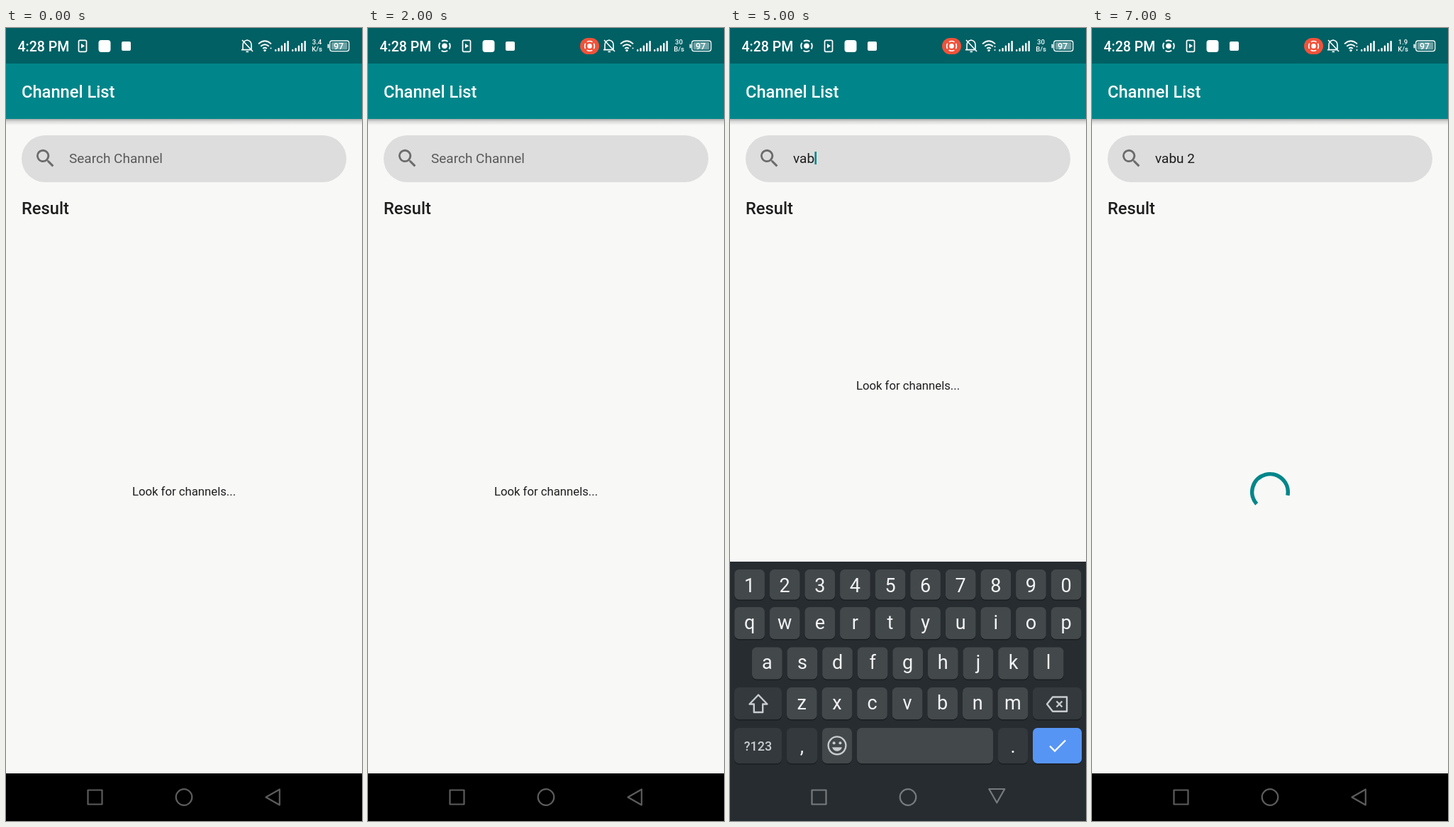
An HTML page for the animation above (8 s loop, 502 by 1116 pixels).

```html
<!DOCTYPE html>
<html lang="en">
<head>
<meta charset="utf-8">
<title>Channel search</title>
<style>
  html, body { margin: 0; width: 100%; height: 100%; overflow: hidden; background: #f8f8f7; }
  svg { display: block; width: 100%; height: 100%; font-family: Roboto, sans-serif; }
  .line { fill: none; stroke: #fff; }
  .white { fill: #fff; }
  .medium { font-weight: 500; }
  .heading { font-weight: 500; font-size: 23.7px; }
  .body { font-size: 19px; }
  .mid { text-anchor: middle; }
  .speed { font-size: 9.5px; font-weight: 500; }
  .icon { fill: none; stroke: #c9cccf; stroke-width: 2.4; stroke-linejoin: round; }
  #nav { fill: none; stroke-width: 2.2; stroke-linejoin: round; }
</style>
</head>
<body>
<svg viewBox="0 0 502 1116" preserveAspectRatio="none">
  <defs>
    <linearGradient id="shade" x2="0" y2="1">
      <stop offset="0" stop-color="#000" stop-opacity=".32"/>
      <stop offset=".4" stop-color="#000" stop-opacity=".12"/>
      <stop offset="1" stop-color="#000" stop-opacity="0"/>
    </linearGradient>
    <g id="record">
      <circle r="3.8"/>
      <circle r="7.8" fill="none" stroke="#fff" stroke-width="1.9" stroke-dasharray="9.2 3.05" stroke-dashoffset="4.6"/>
    </g>
  </defs>

  <rect width="502" height="1116" fill="#f8f8f7"/>
  <rect y="128" width="502" height="9" fill="url(#shade)"/>
  <rect y="50" width="502" height="78" fill="#00868a"/>
  <rect width="502" height="50" fill="#006064"/>

  <text class="white medium" x="16.5" y="32.7" font-size="19.5">4:28 PM</text>
  <use id="leftRecord" href="#record" class="white" x="108" y="25.3"/>
  <g id="notices" class="white">
    <rect class="line" x="102.5" y="17.3" width="11" height="16" rx="1.8" stroke-width="1.7"/>
    <path d="M106 22v6.6l5-3.3z"/>
    <rect x="130.5" y="17" width="17" height="17" rx="4"/>
    <rect x="163" y="19" width="13" height="13" rx="2"/>
  </g>
  <g id="badge">
    <rect x="299" y="14" width="27" height="23" rx="11.5" fill="#f0523a"/>
    <use href="#record" class="white" transform="translate(312.5 25.4) scale(.88)"/>
  </g>
  <g class="line" stroke-width="1.8">
    <path d="M334 31V24q0-6 6-7 6 1 6 7v6M332 30.6h14M333 17l15 16M338.5 33.4h3.5" stroke-width="1.6"/>
    <path d="M356 22.3q9-8 18 0M359.2 25.8q5.8-5 11.6 0M362.2 29q2.8-2.4 5.6 0"/>
  </g>
  <circle class="white" cx="365" cy="31.6" r="1.7"/>
  <g id="dots" class="white"></g>
  <g id="bars" class="white"></g>
  <text id="speed" class="white speed mid" x="438.5" y="23.3"></text>
  <text id="unit" class="white speed mid" x="438.5" y="33.4"></text>
  <rect x="453.5" y="22.5" width="2" height="6" rx="1" class="white"/>
  <rect class="line" x="456.7" y="18" width="27" height="14.6" rx="3" stroke-width="1.3"/>
  <rect x="458.8" y="20" width="22.6" height="10.6" rx="1" fill="#fff" opacity=".42"/>
  <text class="white medium mid" x="469" y="30" font-size="12.5">97</text>

  <text class="white heading" x="22" y="97.5">Channel List</text>
  <rect x="22" y="151" width="458" height="66" rx="33" fill="#dddddd"/>
  <path transform="translate(38.8 166.8) scale(1.394)" fill="#6c6c6c"
    d="M15.5 14h-.8l-.27-.27A6.5 6.5 0 1 0 13.7 14.43l.3.27v.8l5 5L20.5 19zM9.5 14a4.5 4.5 0 1 1 0-9 4.5 4.5 0 0 1 0 9z"/>
  <text id="query" class="body" x="89" y="189.6"></text>
  <rect id="cursor" y="174" width="2.6" height="18" fill="#00868a"/>
  <text class="heading" x="22" y="262" fill="#1e1e1e">Result</text>
  <text id="hint" class="mid" x="251" font-size="16.73" fill="#1e1e1e">Look for channels...</text>
  <path id="spinner" fill="none" stroke="#00868a" stroke-width="5.5"/>

  <rect y="1049" width="502" height="67"/>
  <g id="keyboard">
    <rect y="751" width="502" height="365" fill="#272c30"/>
    <g id="keys"></g>
    <g class="icon">
      <path d="M40 938.5 52.5 951.5H46.2V963H33.8V951.5H27.5z"/>
      <path d="M447 951.5 455 941.5H475V961.8H455zM460.4 947.5l8 8m0-8l-8 8"/>
      <circle cx="151" cy="1009.8" r="12.4"/>
      <path d="M451 1010.5l7 7 15-15" stroke="#fff" stroke-linejoin="miter"/>
    </g>
    <g fill="#c9cccf">
      <circle cx="146.6" cy="1006.3" r="2"/><circle cx="155.4" cy="1006.3" r="2"/>
      <path d="M144 1012.3h14q-2 5.4-7 5.4t-7-5.4z"/>
    </g>
  </g>
  <g id="nav">
    <rect x="115.5" y="1072.5" width="20" height="20"/>
    <circle cx="251" cy="1082.5" r="11.3"/>
    <path id="back" d="M-13 0 6.3-11V11z"/>
  </g>
</svg>
<script>
const $ = id => document.getElementById(id);

function add(parent, tag, attrs, text = '') {
  const node = document.createElementNS('http://www.w3.org/2000/svg', tag);
  for (const name in attrs) node.setAttribute(name, attrs[name]);
  node.textContent = text;
  return parent.appendChild(node);
}

function set(id, attrs) {
  for (const name in attrs) $(id).setAttribute(name, attrs[name]);
}

function show(id, visible) {
  $(id).style.display = visible ? '' : 'none';
}

function drawKey(x, y, w, h, fill, label = '', baseline = 0, size = 27) {
  add($('keys'), 'rect', { x, y: y + 1.5, width: w, height: h, rx: 6.5, fill: '#1a1e21' });
  add($('keys'), 'rect', { x, y, width: w, height: h, rx: 6.5, fill });
  add($('keys'), 'text', {
    x: x + w / 2, y: baseline, class: size < 20 ? 'mid medium' : 'mid',
    'font-size': size, fill: size < 20 ? '#c9cccf' : '#f2f3f4'
  }, label);
}

const KEY = '#43484b', DARK = '#33393d', PITCH = 49.6;
[
  ['1234567890', 6.3, 762, 42.5, 794],
  ['qwertyuiop', 6.3, 815, 45, 845.5],
  ['asdfghjkl', 31, 871.5, 45, 902],
  ['zxcvbnm', 80, 928, 45, 958.5]
].forEach(([letters, left, top, height, baseline]) =>
  [...letters].forEach((letter, i) =>
    drawKey(left + i * PITCH, top, 42.6, height, KEY, letter, baseline)));
drawKey(6, 928, 67, 45, DARK);
drawKey(427, 928, 69, 45, DARK);
drawKey(6, 985, 67, 50, DARK, '?123', 1017, 18);
drawKey(80, 985, 43, 50, DARK, ',', 1020);
drawKey(130, 985, 42, 50, KEY);
drawKey(179, 985, 192, 50, KEY);
drawKey(378, 985, 42, 50, DARK, '.', 1020);
drawKey(427, 985, 69, 50, '#5795f5');

for (const left of [379, 403])
  [3, 5, 8.5, 12, 15].forEach((height, i) =>
    add($('bars'), 'rect', { x: left + i * 4.35, y: 33 - height, width: 2.4, height, rx: 1 }));

const onRing = degrees => {
  const a = degrees * Math.PI / 180;
  return `${251 + 25.3 * Math.cos(a)} ${653 + 25.3 * Math.sin(a)}`;
};
set('spinner', { d: `M${onRing(138)}A25.3 25.3 0 1 1 ${onRing(11)}` });

const BACK = {
  left: 'translate(379.5 1082.5)',
  turning: 'translate(378.7 1081.2) rotate(-24)',
  down: 'translate(376.3 1077.3) rotate(-90)'
};
const STEP = 1000;
const base = { badge: true, shifted: true, rate: '30 B/s', dots: 2, back: 'left', query: '' };
const steps = [
  { badge: false, shifted: false, rate: '3.4 K/s', dots: 1 },
  { shifted: false, rate: '3.4 K/s', dots: 1 },
  { dots: 1 },
  { cursor: true, back: 'turning' },
  { cursor: true, back: 'down', keyboard: true },
  { cursor: true, back: 'down', keyboard: true, query: 'vab' },
  { back: 'down', keyboard: true, query: 'vabu 2' },
  { rate: '1.9 K/s', query: 'vabu 2', loading: true }
].map(step => ({ ...base, ...step }));

function render(s) {
  show('badge', s.badge);
  show('leftRecord', s.shifted);
  set('notices', { transform: `translate(${s.shifted ? 31 : 0} 0)` });
  const [speed, unit] = s.rate.split(' ');
  $('speed').textContent = speed;
  $('unit').textContent = unit;
  $('dots').replaceChildren();
  for (const cy of s.dots > 1 ? [26.3, 31] : [28.6])
    add($('dots'), 'circle', { cx: 373.5, cy, r: 1 });

  $('query').textContent = s.query || 'Search Channel';
  set('query', { fill: s.query ? '#1b1b1b' : '#595959' });
  set('cursor', { x: 89.3 + (s.query ? $('query').getComputedTextLength() : 0) });
  show('cursor', s.cursor);
  show('hint', !s.loading);
  set('hint', { y: s.keyboard ? 509 : 658.3 });
  show('spinner', s.loading);
  show('keyboard', s.keyboard);
  set('nav', { stroke: s.keyboard ? '#777b7e' : '#5c5c5c' });
  set('back', { transform: BACK[s.back] });
}

const start = performance.now();
let shown = -1;
function tick() {
  const index = Math.floor((performance.now() - start) / STEP) % steps.length;
  if (index !== shown) render(steps[shown = index]);
  requestAnimationFrame(tick);
}
tick();
</script>
</body>
</html>
```
